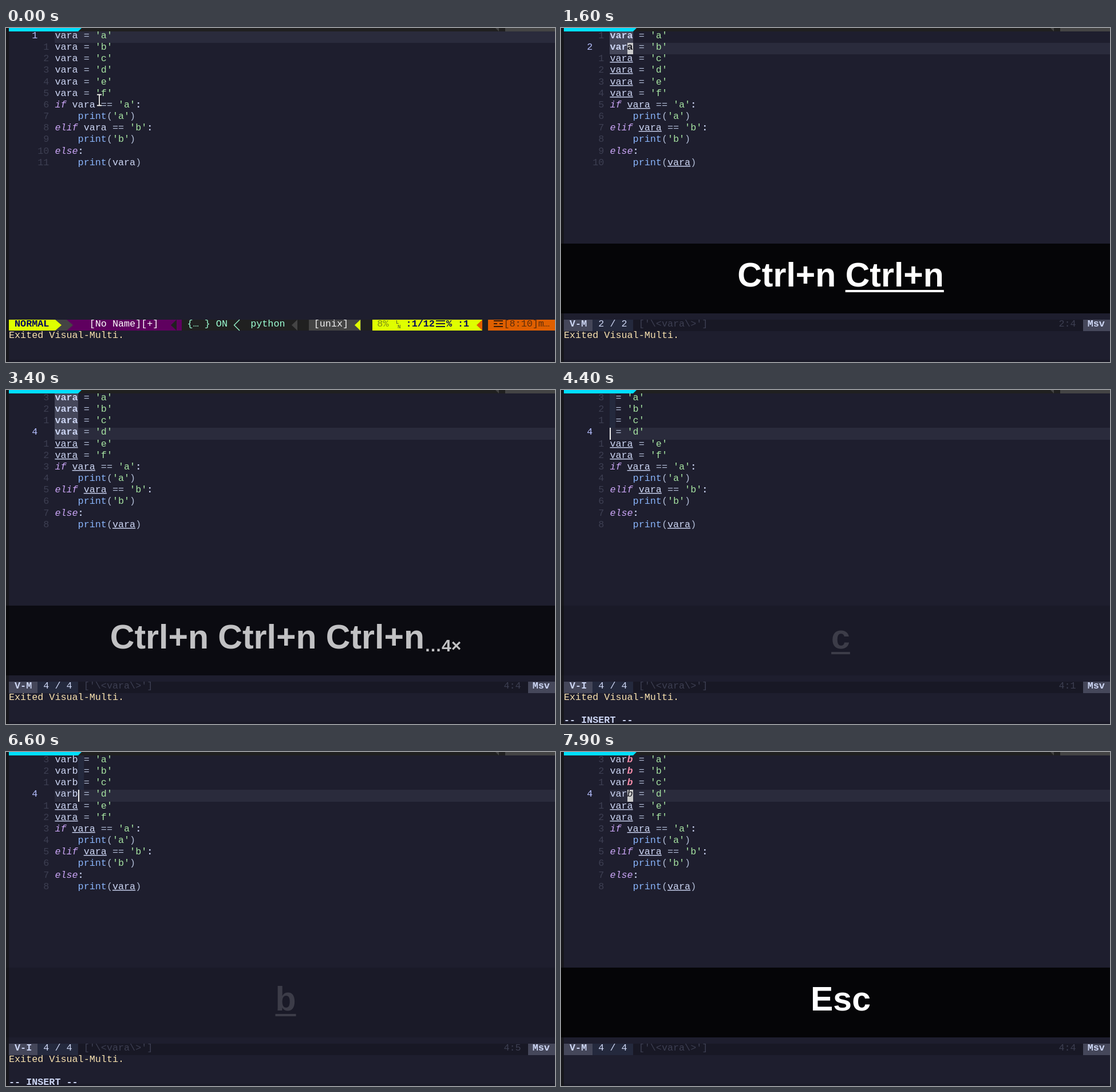
Write an HTML page with a canvas that moves like this. It is 959 px wide and 584 px high and loops after 8000 ms.

```html
<!DOCTYPE html>
<html lang="en">
<head>
<meta charset="utf-8">
<title>Multiple cursors</title>
<style>
html, body { margin: 0; width: 100%; height: 100%; overflow: hidden; background: #1e1e2e; }
canvas { display: block; }
</style>
</head>
<body>
<canvas id="stage" width="959" height="584"></canvas>
<script>
const ctx = document.getElementById('stage').getContext('2d');
const LOOP = 8000, CW = 10.052, RH = 20.15, GUTTER = 8;
const MONO = '16.75px "Liberation Mono", monospace';
const SANS = '"Liberation Sans", Arial, sans-serif';
const C = {
  base: '#1e1e2e', line: '#2a2b3c', mantle: '#181825', select: '#45475a', mark: '#24293d',
  text: '#cdd6f4', dim: '#3d3f52', string: '#a6e3a1', keyword: '#cba6f7', call: '#89b4fa',
  op: '#b0bbd4', lavender: '#b4befe', red: '#f38ba8', cursor: '#cbcbcb',
  lime: '#dfff00', navy: '#00005f', gray: '#444444', dark: '#202020', purple: '#5f005f',
  mint: '#9cffd3', orange: '#df5f00'
};
const CODE = [
  ...[...'abcdef'].map(c => `vara = '${c}'`),
  "if vara == 'a':", "    print('a')", "elif vara == 'b':", "    print('b')", 'else:', '    print(vara)'
];
const PICKS = [1100, 1600, 2100, 2700];
const EDITS = [[4400, ''], [5300, 'v'], [5500, 'va'], [5700, 'var'], [6600, 'varb']];
const ESCAPE = 7600;
const BLINK_OFF = [[0, 100], [600, 800], [3400, 3700], [4200, 4400], [5000, 5200], [6300, 6500], [7200, 7400]];
// Key overlays: start, first opacity, start of fade-out, typed keys
const OVERLAYS = [
  { start: 1100, alpha: .08, out: 3400, keys: [[1100, 'Ctrl+n'], [1600, ' Ctrl+n'], [2100, ' Ctrl+n'], [2700, '…4×', 30]] },
  { start: 4400, alpha: .15, out: 5000, keys: [[4400, 'c']] },
  { start: 5300, alpha: .03, out: 6500, keys: [[5300, 'v'], [5500, 'a'], [5700, 'r']] },
  { start: 6600, alpha: .15, out: 7200, keys: [[6600, 'b']] },
  { start: 7600, alpha: .15, out: LOOP, keys: [[7600, 'Esc']] }
];

const colX = col => 5 + CW * col;
const rowY = row => 6 + RH * row;

function rect(x0, y0, x1, y1, color) {
  ctx.fillStyle = color;
  ctx.fillRect(x0, y0, x1 - x0, y1 - y0);
}
function poly(color, ...points) {
  ctx.fillStyle = color;
  ctx.beginPath();
  for (let i = 0; i < points.length; i += 2) ctx.lineTo(points[i], points[i + 1]);
  ctx.fill();
}
function cells(row, from, to, color) {
  rect(Math.round(colX(from)), Math.round(rowY(row)), Math.round(colX(to)), Math.round(rowY(row + 1)), color);
}
function write(row, col, text, color, style = '') {
  ctx.font = `${style} ${MONO}`;
  ctx.fillStyle = color;
  ctx.fillText(text, colX(col), rowY(row) + 12);
}
function underline(row, from, to, color) {
  rect(colX(from), Math.round(rowY(row) + 13), colX(to), Math.round(rowY(row) + 13) + 1.4, color);
}

function stateAt(t) {
  const picked = PICKS.filter(p => t >= p).length;
  const edit = EDITS.filter(e => t >= e[0]).pop();
  return {
    t, picked, multi: picked > 0, current: Math.max(0, picked - 1),
    word: edit ? edit[1] : 'vara', edited: !!edit,
    inserting: !!edit && t < ESCAPE,
    cursorOn: !BLINK_OFF.some(([a, b]) => t >= a && t < b)
  };
}

function drawWord(s, row, col) {
  const chosen = row < s.picked, word = chosen ? s.word : 'vara';
  const end = col + word.length;
  if (!chosen) {
    write(row, col, word, C.text);
    if (s.multi) underline(row, col, end, C.text);
  } else if (!s.edited) {
    cells(row, col, end, C.select);
    write(row, col, word, C.text, 'bold');
  } else if (s.inserting) {
    if (row !== s.current) cells(row, end, end + 1, C.mark);
    write(row, col, word, C.text);
  } else {
    write(row, col, word.slice(0, -1), C.text);
    write(row, end - 1, 'b', C.red, 'italic bold');
  }
  return word.length;
}

function drawCode(s) {
  cells(s.current, GUTTER, 96, C.line);
  CODE.forEach((source, row) => {
    const here = row === s.current;
    const number = here ? String(row + 1) : String(Math.abs(row - s.current));
    write(row, here ? 4 : 7 - number.length, number, here ? C.lavender : C.dim);
    let col = GUTTER;
    for (const token of source.match(/'\w'|\w+|=+|[():]|\s+/g)) {
      if (token === 'vara') { col += drawWord(s, row, col); continue; }
      if (/^(if|elif|else)$/.test(token)) write(row, col, token, C.keyword, 'italic');
      else if (token === 'print') write(row, col, token, C.call);
      else if (token[0] === "'") write(row, col, token, C.string);
      else if (token === ':') write(row, col, token, C.text, 'bold');
      else write(row, col, token, C.op);
      col += token.length;
    }
  });
}

function drawCursor(s) {
  if (!s.cursorOn) return;
  if (s.inserting) {
    const x = Math.round(colX(GUTTER + s.word.length));
    return rect(x, 66, x + 2, 87, '#f0f0f0');
  }
  const col = GUTTER + (s.multi ? 3 : 0);
  cells(s.current, col, col + 1, C.cursor);
  const style = s.edited ? 'italic' : s.multi ? 'bold' : '';
  write(s.current, col, s.multi ? s.word[3] : 'v', '#11111b', style);
}

function drawPopup(s) {
  const n = s.word.length;
  if (!s.inserting || n < 1 || n > 3) return;
  cells(4, 7, 23, C.select);
  write(4, 8, 'vara', C.text);
  write(4, 8, 'vara'.slice(0, n), '#2fa3b7');
  underline(4, 8, 8 + n, '#2fa3b7');
  underline(4, 8 + n, 12, C.text);
  write(4, 19, '[A]', '#70748c', 'italic');
}

const arrowRight = (x, color) => poly(color, x, 510, x + 11, 519.5, x, 529);
const arrowLeft = (x, color) => poly(color, x + 10, 510, x, 519.5, x + 10, 529);

function drawNormalBar() {
  const block = (x0, x1, color) => rect(x0, 510, x1, 529, color);
  block(5, 959, C.dark);
  block(5, 86, C.lime);
  block(86, 107, C.gray);
  arrowRight(86, C.lime);
  block(106, 307, C.purple);
  arrowRight(106, C.gray);
  arrowLeft(288, C.dark);
  arrowLeft(499, C.gray);
  block(529, 620, C.gray);
  arrowLeft(609, C.lime);
  block(640, 832, C.lime);
  arrowLeft(822, C.orange);
  block(842, 959, C.orange);
  write(25, 1, 'NORMAL', C.navy, 'bold');
  write(25, 14, '[No Name][+]', '#ffffff');
  write(25, 31, '{…', C.mint);
  write(25, 34, '}', C.mint);
  write(25, 36, 'ON', C.mint);
  write(25, 42, 'python', C.mint);
  ctx.strokeStyle = C.mint;
  ctx.lineWidth = 1.3;
  ctx.beginPath();
  ctx.moveTo(408, 510);
  ctx.lineTo(398.5, 519.5);
  ctx.lineTo(408, 529);
  ctx.stroke();
  write(25, 53, '[unix]', '#f0f0f0');
  write(25, 64, '8%', '#7d8c14');
  ctx.font = '9px "Liberation Mono", monospace';
  ctx.fillStyle = '#3c4430';
  ctx.fillText('L', 681, 517);
  ctx.fillText('N', 684, 525);
  write(25, 69, ':1/12', C.navy, 'bold');
  write(25, 76, '%', C.navy, 'bold');
  write(25, 78, ':1', C.navy, 'bold');
  for (const y of [511, 516, 521]) {
    rect(751, y, 767, y + 2, '#20203a');
    rect(852, y, 868, y + 2, '#3a1c08');
  }
  rect(858, 516, 862, 518, C.orange);
  write(25, 86, '[8:10]m…', '#5e2c0a');
}

function drawMultiBar(s) {
  cells(25, 0, 95, C.mantle);
  cells(25, 0, 5, C.select);
  cells(25, 5, 12, C.mark);
  rect(912, 510, 959, 530, C.select);
  write(25, 1, s.inserting ? 'V-I' : 'V-M', C.text, 'bold');
  write(25, 6, `${s.picked} / ${s.picked}`, C.text);
  write(25, 13, "['\\<vara\\>']", C.dim);
  const column = s.inserting ? s.word.length + 1 : 4;
  write(25, 86, `${s.current + 1}:${column}`, C.dim);
  write(25, 91, 'Msv', C.text, 'bold');
}

function drawFrame() {
  rect(0, 0, 959, 584, C.base);
  rect(0, 0, 959, 6, C.dark);
  poly('#00dfff', 5, 0, 132, 0, 126, 6, 5, 6);
  poly(C.gray, 855, 0, 861, 0, 861, 6);
  rect(872, 0, 959, 6, C.gray);
  rect(0, 0, 5, 584, '#17171c');
  rect(5, 580, 959, 584, '#1a1a28');
}

function drawMouse() {
  const beam = (width, color) => {
    ctx.strokeStyle = color;
    ctx.lineWidth = width;
    ctx.beginPath();
    ctx.moveTo(159, 116.5); ctx.lineTo(167, 116.5);
    ctx.moveTo(163, 116.5); ctx.lineTo(163, 135.5);
    ctx.moveTo(159, 135.5); ctx.lineTo(167, 135.5);
    ctx.stroke();
  };
  beam(4, '#111118');
  beam(1.8, '#f4f4f4');
}

function drawOverlay(t) {
  const o = OVERLAYS.filter(v => t >= v.start).pop();
  if (!o) return;
  const rise = o.alpha + .285 * (t - o.start) / 100;
  const fall = 1 - (t - o.out + 100) / 400;
  const alpha = Math.max(0, Math.min(1, rise, t >= o.out ? fall : 1));
  if (!alpha) return;
  ctx.globalAlpha = alpha;
  rect(0, 377, 959, 499, 'rgba(0,0,0,.84)');
  const setFont = size => { ctx.font = `bold ${size || 59}px ${SANS}`; };
  const measure = (text, size) => { setFont(size); return ctx.measureText(text).width; };
  const keys = o.keys.filter(k => t >= k[0]);
  let x = 488.5 - keys.reduce((sum, [, text, size]) => sum + measure(text, size), 0) / 2;
  for (const [time, text, size] of keys) {
    const width = measure(text, size), inner = measure(text.trim(), size);
    ctx.fillStyle = '#ffffff';
    ctx.fillText(text, x, size ? 457 : 452);
    x += width;
    if (t - time < 200) rect(x - inner, 458, x, 462, '#ffffff');
  }
  ctx.globalAlpha = 1;
}

function draw(t) {
  const s = stateAt(t);
  drawFrame();
  drawCode(s);
  drawCursor(s);
  drawPopup(s);
  s.multi ? drawMultiBar(s) : drawNormalBar();
  if (t < ESCAPE) write(26, 0, 'Exited Visual-Multi.', '#f9e2af');
  if (s.inserting) write(28, 0, '-- INSERT --', C.text, 'bold');
  if (t < 800) drawMouse();
  drawOverlay(t);
}

const begin = performance.now();
function tick() {
  const t = (performance.now() - begin) % LOOP;
  draw(Math.floor(t / 100) * 100);
  requestAnimationFrame(tick);
}
tick();
</script>
</body>
</html>
```
